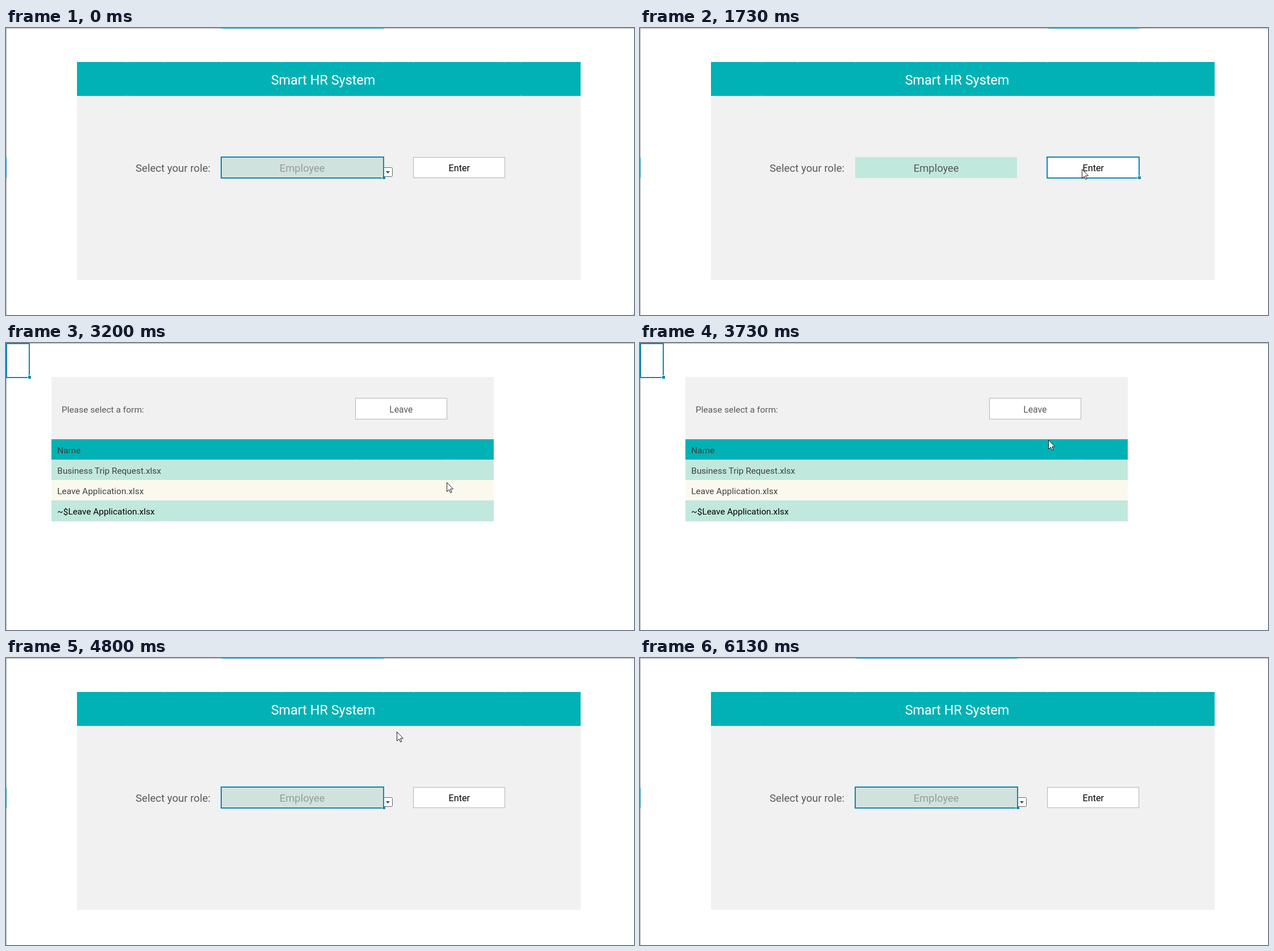
Write an HTML page that moves like this. It is 1106 by 507 pixels and loops after 6740 ms.

```html
<!DOCTYPE html>
<html lang="en">
<head>
<meta charset="utf-8">
<title>HR form</title>
<style>
html, body { margin: 0; height: 100%; overflow: hidden; background: #fff; }
svg { display: block; font-family: Roboto, "Noto Sans", sans-serif; }
</style>
</head>
<body>
<svg id="stage" width="1106" height="507" viewBox="0 0 1106 507"></svg>
<script>
const TEAL = '#00b2b5', MINT = '#c1e8dc', GREY = '#f1f1f1', BLUE = '#0e86b0', LINE = '#ababab', INK = '#595959';

const rect = (x, y, w, h, fill, extra = '') =>
  `<rect x="${x}" y="${y}" width="${w}" height="${h}" fill="${fill}" ${extra}/>`;
const text = (x, y, size, str, fill = INK, anchor = 'start') =>
  `<text x="${x}" y="${y}" font-size="${size}" fill="${fill}" text-anchor="${anchor}">${str}</text>`;
const group = (id, content) => `<g id="${id}">${content}</g>`;
const button = (x, y, h) => rect(x + .5, y + .5, 161, h - 1, '#fff', 'stroke="#b4b4b4"');
const ticks = (xs, y, fill) => xs.map(x => rect(x, y, 1, 1, fill)).join('');

// Selection border, fill handle and the marks on the sheet headers
const select = (x, y, w, h) =>
  rect(x + 1, y + 1, w - 2, h - 2, 'none', `stroke="${BLUE}" stroke-width="2"`) +
  rect(x + w - 4, y + h - 5, 7, 7, '#fff') + rect(x + w - 3, y + h - 4, 5, 5, BLUE) +
  rect(x + 2, 0, w - 3, 1, BLUE) + rect(0, y + 2, 1, h - 3, BLUE);

const menu = rect(125, 60, 887, 60, TEAL) + rect(125, 120, 887, 325, GREY) + rect(125, 120, 887, 1, '#f8f8f8') +
  ticks([211, 277, 379, 485, 570, 664, 717, 878, 906], 60, '#8fd9da') + ticks([211, 906], 119, '#8fd9da') +
  text(558.5, 100, 23.4, 'Smart HR System', '#fff', 'middle') +
  text(228.3, 254, 18.6, 'Select your role:') +
  rect(379, 228, 285, 37, MINT) + button(717, 228, 37) +
  group('roleOff', text(521.7, 254, 18.4, 'Employee', INK, 'middle') + select(716, 227, 164, 39)) +
  group('roleOn', rect(379, 228, 286, 38, '#d0e2de') + text(521.7, 254, 18.4, 'Employee', '#979d9a', 'middle') +
    select(378, 227, 288, 39) +
    rect(664.5, 246.5, 16, 16, '#fff', 'rx="2" stroke="#606470"') +
    rect(662, 246, 2, 17, '#d0e2de') + rect(664, 227, 2, 36, BLUE) +
    '<path d="M669 253h7l-3.5 4z" fill="#444"/>') +
  text(798.3, 253, 16.2, 'Enter', '#000', 'middle');

const rows = [
  ['Name', TEAL, '#404040'],
  ['Business Trip Request.xlsx', MINT, '#404040'],
  ['Leave Application.xlsx', '#fbf9ed', '#404040'],
  ['~$Leave Application.xlsx', MINT, '#000']
];
const forms = rect(80, 60, 779, 110, GREY) + text(98, 123, 15.55, 'Please select a form:') +
  rows.map(([str, fill, ink], i) =>
    rect(80, 170 + 36 * i, 779, i == 3 ? 37 : 36, fill) + text(90.3, 195 + 36 * i, 15.4, str, ink)).join('') +
  ticks([615, 776], 169, '#fff') + ticks([615, 776], 205, '#7fd0d1') +
  button(615, 97, 38) +
  group('homeCell', select(0, 0, 42, 62) + rect(0, 0, 1, 62, BLUE) + rect(0, 0, 42, 1, BLUE)) +
  group('leaveCell', select(614, 96, 164, 40)) +
  text(695.8, 123, 15.7, 'Leave', INK, 'middle');

const stage = document.getElementById('stage');
stage.innerHTML = rect(0, 0, 1106, 1, LINE) + rect(0, 0, 1, 507, LINE) + group('menu', menu) + group('forms', forms) +
  group('pointer', '<path d="M.5 .5V16.5L4.3 13L6.8 18.5L9 17.5L6.6 12H11.5Z" fill="#fff" stroke="#1a1a24"/>');

const part = id => document.getElementById(id);
const show = (id, on) => part(id).setAttribute('display', on ? 'inline' : 'none');

// Pointer moves: first and last step, start and end point
const moves = [
  [7, 20, 1105, 506, 778, 249],
  [47, 63, 778, 249, 688, 130],
  [80, 94, 688, 130, 35, 519]
];
const ease = p => { const q = p ** .88; return q * q * (3 - 2 * q); };

function pointerAt(step) {
  const [from, to, x0, y0, x1, y1] = moves.findLast(m => step >= m[0]) || moves[0];
  const e = ease(Math.min(1, Math.max(0, (step - from) / (to - from))));
  return [x0 + (x1 - x0) * e, y0 + (y1 - y0) * e].map(Math.round);
}

function draw(now) {
  const step = Math.floor((now % 6740 + 5) * 15 / 1000);
  const inForms = step >= 32 && step < 72;
  const entered = step >= 26 && step < 32;
  show('menu', !inForms);
  show('forms', inForms);
  show('roleOn', !entered);
  show('roleOff', entered);
  show('homeCell', step < 68);
  show('leaveCell', step >= 68);
  show('pointer', step < 92);
  part('pointer').setAttribute('transform', `translate(${pointerAt(step)})`);
}

const start = performance.now();
function tick() {
  draw(performance.now() - start);
  requestAnimationFrame(tick);
}
tick();
</script>
</body>
</html>
```
